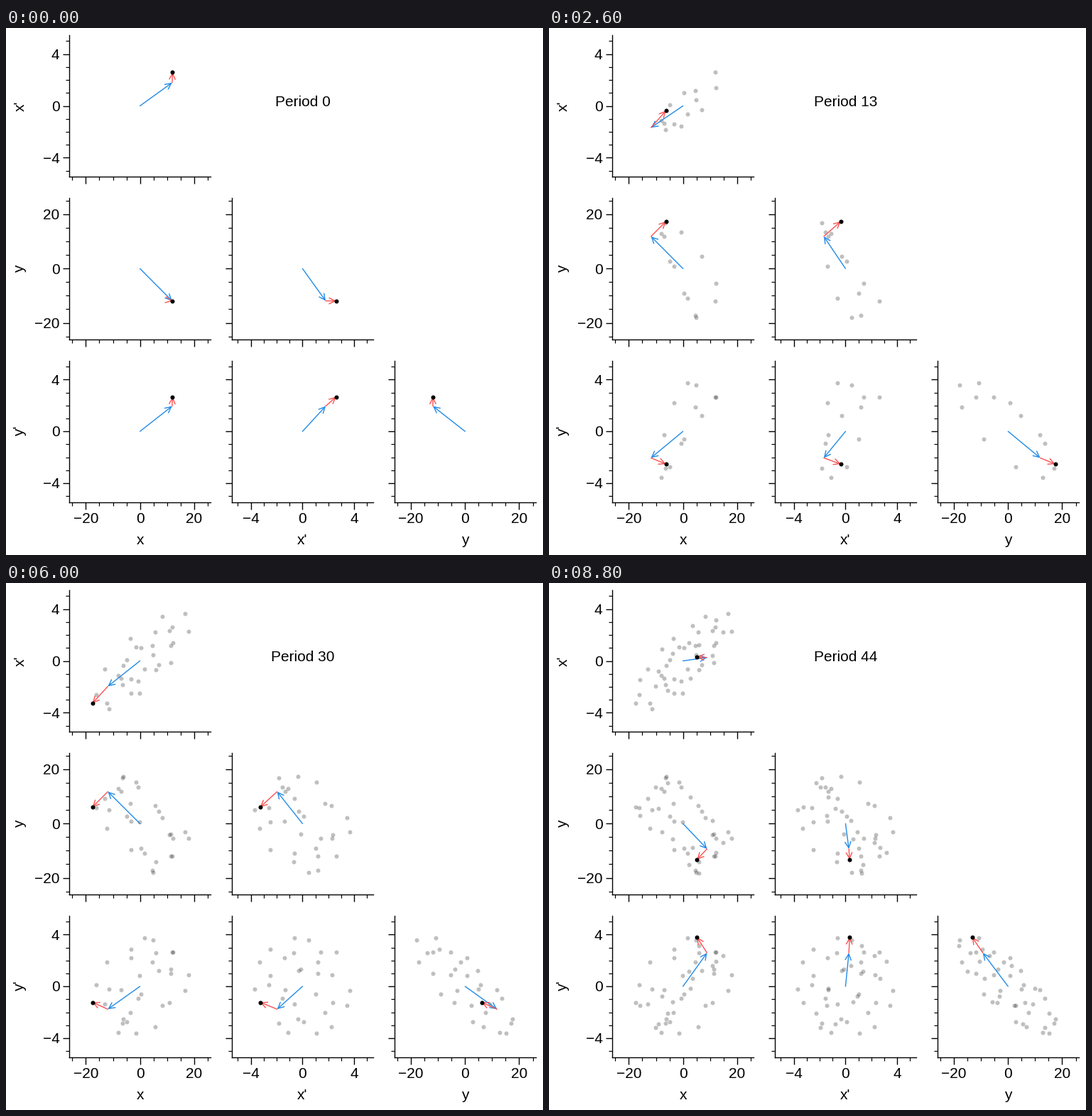
Animation of 756 by 741 pixels, one loop 9000 ms. Source, as a matplotlib script:

```python
import matplotlib.pyplot as plt
import numpy as np
from matplotlib.animation import FuncAnimation
from matplotlib.patches import FancyArrowPatch
from matplotlib.ticker import MultipleLocator

W, H, DPI = 756, 741, 96
PX = 72 / DPI  # points per pixel
PERIODS = 45
BLUE, RED = "#228be6", "#fa5252"

plt.rcParams["font.family"] = "Liberation Sans"
plt.rcParams["font.size"] = 20.83 * PX

NAMES = ["x", "x'", "y", "y'"]
LIMITS = [26.1, 5.46, 26.1, 5.46]
MAJOR = [20, 4, 20, 4]
MINOR = [5, 1, 5, 1]

# Phase advance per period of the two modes, and their cosine and sine parts
# in each of x, x', y, y'.
ADVANCE = np.radians([41.8, 31.92])
MODE_1 = np.array([[11.88, 1.79, -11.9, 1.95], [-0.5, -1.785, -0.15, 1.70]])
MODE_2 = np.array([[0.17, 0.81, -0.03, 0.72], [6.66, 1.035, 6.8, -1.09]])


def oscillate(mode, advance):
    phase = advance * np.arange(PERIODS)
    return np.column_stack([np.cos(phase), np.sin(phase)]) @ mode


first = oscillate(MODE_1, ADVANCE[0])
total = first + oscillate(MODE_2, ADVANCE[1])

fig = plt.figure(figsize=(W / DPI, H / DPI), dpi=DPI, facecolor="white")

SIZE, STEP = 198.8, 228.85
LEFT, TOP = 89.2, 10.1


def label(x, y, text, **kw):
    kw = {"ha": "center", "va": "baseline", **kw}
    return fig.text(x / W, 1 - y / H, text, color="black", **kw)


def make_axes(row, col):
    left, top = LEFT + STEP * col, TOP + STEP * row
    ax = fig.add_axes([left / W, 1 - (top + SIZE) / H, SIZE / W, SIZE / H])
    ax.patch.set_visible(False)
    ax.spines[["top", "right"]].set_visible(False)
    ax.spines[["left", "bottom"]].set_linewidth(1.39 * PX)
    xvar, yvar = col, row + 1
    ax.set_xlim(-LIMITS[xvar], LIMITS[xvar])
    ax.set_ylim(-LIMITS[yvar], LIMITS[yvar])
    for axis, var in ((ax.xaxis, xvar), (ax.yaxis, yvar)):
        axis.set_major_locator(MultipleLocator(MAJOR[var]))
        axis.set_minor_locator(MultipleLocator(MINOR[var]))
    ax.tick_params(which="major", length=9.5 * PX, width=1.39 * PX,
                   labelleft=False, labelbottom=False)
    ax.tick_params(which="minor", length=5 * PX, width=1.2 * PX)
    return ax


def tick_labels(var):
    for value in (-MAJOR[var], 0, MAJOR[var]):
        offset = value / LIMITS[var] * SIZE / 2
        yield offset, str(value).replace("-", "\u2212")


def center(start, index):
    return start + STEP * index + SIZE / 2


for i in range(3):
    cx, cy = center(LEFT, i), center(TOP, i)
    for offset, text in tick_labels(i):
        label(cx + offset, 696.5, text)
    for offset, text in tick_labels(i + 1):
        label(75.5, cy - offset + 7.3, text, ha="right")
    label(cx, 725.5, NAMES[i])
    label(25.5, cy, NAMES[i + 1], rotation=90, rotation_mode="anchor")

title = label(417.5, 110, "")


def make_arrow(ax, color, zorder):
    arrow = FancyArrowPatch((0, 0), (1, 1), arrowstyle="->", color=color,
                            mutation_scale=20.83 * PX, lw=1.39 * PX,
                            shrinkA=0, shrinkB=0, zorder=zorder)
    arrow.set_clip_on(False)
    return ax.add_patch(arrow)


class Panel:
    def __init__(self, row, col):
        self.vars = [col, row + 1]
        ax = make_axes(row, col)
        # One line per point, so that overlapping dots darken each other.
        dot = dict(marker="o", ls="none", color="black", mew=0, ms=6 * PX)
        points = total[:, self.vars]
        self.past = [ax.plot(*p, alpha=0.25, zorder=2, **dot)[0]
                     for p in points]
        self.now, = ax.plot([], [], zorder=5, **dot)
        self.blue = make_arrow(ax, BLUE, 3)
        self.red = make_arrow(ax, RED, 4)

    def show(self, n):
        mid, end = first[n, self.vars], total[n, self.vars]
        for i, dot in enumerate(self.past):
            dot.set_visible(i < n)
        self.now.set_data([end[0]], [end[1]])
        self.blue.set_positions((0, 0), mid)
        self.red.set_positions(mid, end)


panels = [Panel(row, col) for row in range(3) for col in range(row + 1)]


def update(n):
    title.set_text(f"Period {n}")
    for panel in panels:
        panel.show(n)


anim = FuncAnimation(fig, update, frames=PERIODS, interval=200,
                     init_func=lambda: update(0), repeat=True, repeat_delay=0)
plt.show()
```
